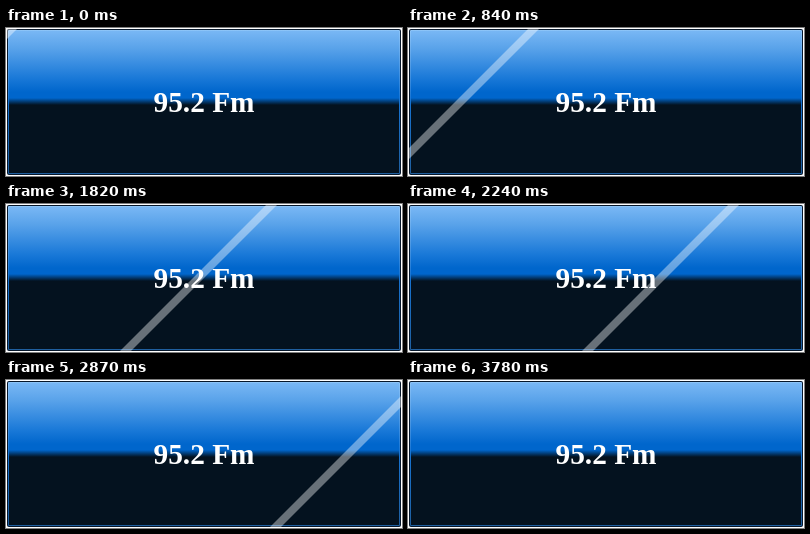
These frames come from a looping animation (396 px wide and 148 px high, 4.78 s). An HTML page with a canvas:

```html
<!DOCTYPE html>
<html lang="en">
<head>
<meta charset="utf-8">
<title>95.2 Fm</title>
<style>
  html, body { margin: 0; width: 100%; height: 100%; overflow: hidden; background: #fff; }
  canvas { display: block; }
</style>
</head>
<body>
<canvas id="stage" width="396" height="148"></canvas>
<script>
const ctx = document.getElementById('stage').getContext('2d');
const LOOP = 4780, STEP = 70, LAST = 54;

const fill = ctx.createLinearGradient(0, 2, 0, 146);
for (const [y, color] of [[2, '#7ab8f5'], [20, '#5aa3ea'], [50, '#1a79d8'], [64, '#0066cc'],
                          [70, '#0066cc'], [77, '#04121f'], [146, '#04121f']]) {
  fill.addColorStop((y - 2) / 144, color);
}
const rim = ctx.createLinearGradient(0, 2, 0, 146);
rim.addColorStop(0, '#8cc4f8');
rim.addColorStop(0.5, '#1673d2');
rim.addColorStop(1, '#1f5f9f');

function box(inset, radius, color) {
  ctx.beginPath();
  ctx.roundRect(inset, inset, 396 - 2 * inset, 148 - 2 * inset, radius);
  ctx.fillStyle = color;
  ctx.fill();
}

// Diagonal streak of light, moving 10 px to the right per step
function streak(step) {
  const left = 10 * step + 1, right = left + 11;
  ctx.save();
  ctx.beginPath();
  ctx.roundRect(1, 1, 394, 146, 2);
  ctx.clip();
  ctx.beginPath();
  ctx.moveTo(left, 0);
  ctx.lineTo(right, 0);
  ctx.lineTo(right - 148, 148);
  ctx.lineTo(left - 148, 148);
  ctx.fillStyle = 'rgba(255, 255, 255, 0.4)';
  ctx.fill();
  ctx.restore();
}

function draw(now) {
  const step = Math.min(LAST, Math.floor(now % LOOP / STEP));
  ctx.fillStyle = '#fff';
  ctx.fillRect(0, 0, 396, 148);
  box(1, 2, '#06172b');
  box(2, 1, rim);
  box(3, 0, fill);

  ctx.font = 'bold 29.33px "Liberation Serif", "Times New Roman", serif';
  ctx.textAlign = 'center';
  ctx.fillStyle = '#fff';
  ctx.fillText('95.2 Fm', 198, 84);

  if (step < LAST) streak(step);
}

const start = performance.now();
function tick() {
  draw(performance.now() - start);
  requestAnimationFrame(tick);
}
tick();
</script>
</body>
</html>
```
